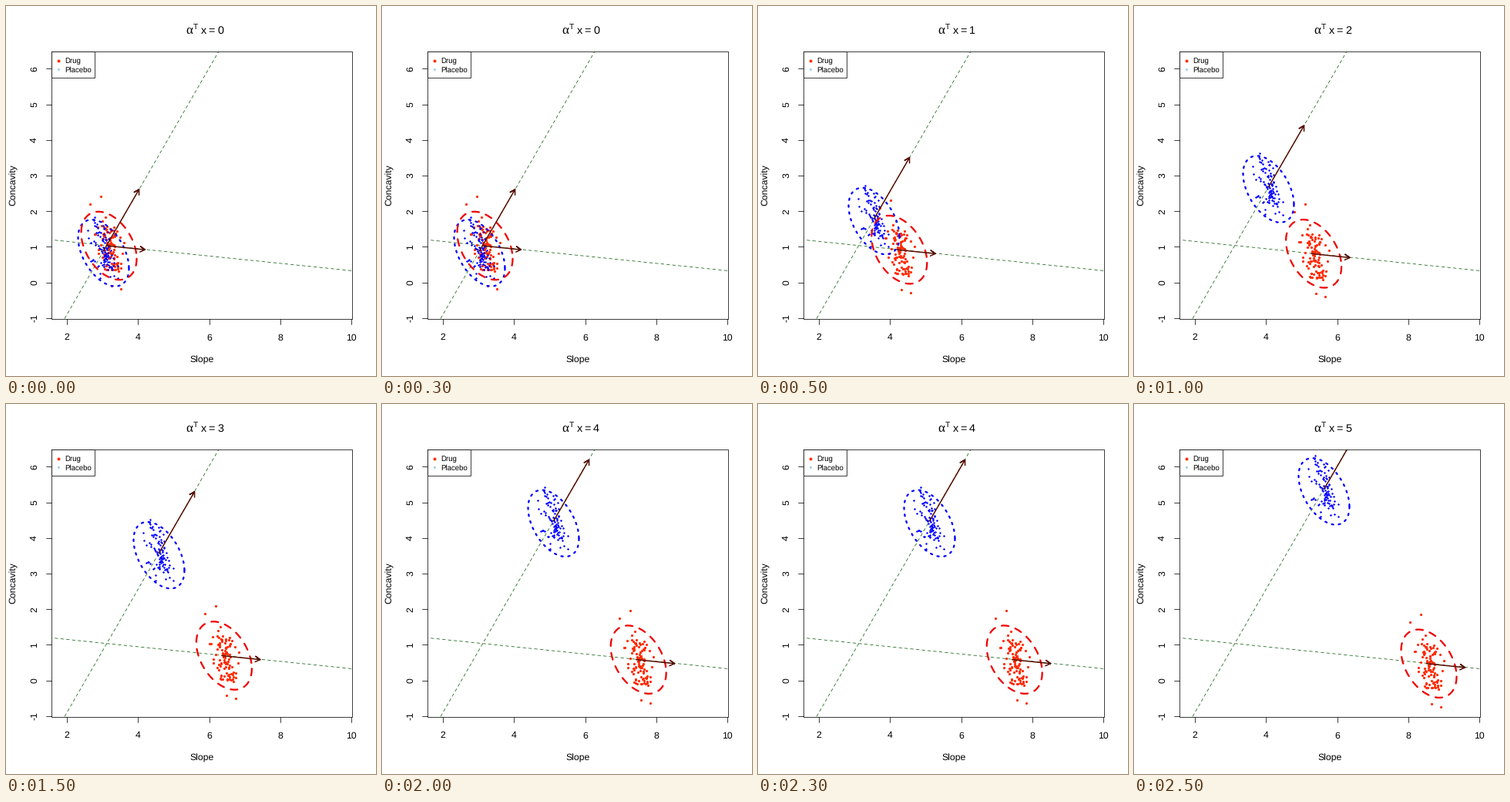
These frames come from a looping animation (480 by 480 pixels, 3000 ms). A matplotlib script:

```python
import numpy as np
import matplotlib.pyplot as plt
from matplotlib.animation import FuncAnimation

plt.rcParams.update({
    "font.family": "Liberation Sans",
    "text.hinting": "none",
    "lines.solid_capstyle": "round",
    "lines.dash_capstyle": "round",
})

STAGE, DPI = 480, 72
LEFT, RIGHT, TOP, BOTTOM = 59, 449.2, 59, 406.2
UNIT = 46.2
RED, BLUE, BROWN, GREEN = "#ff2a00", "#0000ff", "#560d00", "#0a5f0a"

rng = np.random.default_rng(12)


def px(x):
    return 78.7 + UNIT * (x - 2)


def py(y):
    return 358.5 - UNIT * y


def cloud(low, high, x0, lean, spread, count=98):
    """Random points scattered about a leaning axis."""
    y = rng.triangular(low, -3, high, count)
    x = x0 + lean * y + rng.normal(0, spread, count)
    return np.column_stack([x, y])


def ellipse(cx, cy, half_w, half_h, rho):
    t = np.linspace(0, 2 * np.pi, 200)
    x = cx + half_w * np.cos(t)
    y = cy + half_h * (rho * np.cos(t) + np.sqrt(1 - rho ** 2) * np.sin(t))
    return np.column_stack([x, y])


def arrow(vec, head=7.2):
    """Shaft and open head as one polyline starting at the origin."""
    tip = np.array(vec, float)
    back = np.arctan2(-tip[1], -tip[0])
    barbs = [tip + head * np.array([np.cos(back + a), np.sin(back + a)])
             for a in (np.pi / 6, -np.pi / 6)]
    return np.array([(0, 0), tip, barbs[0], tip, barbs[1]])


class Group:
    """A cloud with its ellipse and arrow, moved along one direction."""

    def __init__(self, start, step, parts):
        self.start, self.step = np.array(start), np.array(step)
        self.parts = [(shape, ax.plot([], [], **style)[0])
                      for shape, style in parts]

    def move(self, k):
        for shape, line in self.parts:
            line.set_data(*(shape + self.start + k * self.step).T)


fig = plt.figure(figsize=(STAGE / DPI, STAGE / DPI), dpi=DPI, facecolor="white")
ax = fig.add_axes([LEFT / STAGE, 1 - BOTTOM / STAGE,
                   (RIGHT - LEFT) / STAGE, (BOTTOM - TOP) / STAGE])
ax.set(xlim=(LEFT, RIGHT), ylim=(BOTTOM, TOP))
ax.axis("off")


def stroke(x, y, **kw):
    ax.plot(x, y, color="black", lw=0.75, clip_on=False, **kw)


def label(x, y, text, size=12.2, ha="center", **kw):
    return ax.text(x, y, text, size=size, ha=ha, va="baseline", **kw)


def side_label(x, y, text):
    ax.text(x, y, text, size=12.2, rotation=90, ha="right", va="center")


# Guide lines
for xs, ys in (((76.2, 276.5), (405.2, 58)), ((63.5, 449.5), (303.8, 343.5))):
    ax.plot(xs, ys, color=GREEN, lw=0.75, ls=(0, (5, 5)))

# Moving groups
red_step, blue_step = np.array([49.8, 5.15]), np.array([24, -41.4])
strays = [(-22, -54), (-8, -64), (6, 52), (18, 56)]
red_points = np.vstack([strays, cloud(-40, 46, 4, 0.15, 7.3)])
blue_points = cloud(-46, 40, 0, 0.22, 6.6)
shaft = dict(color=BROWN, lw=1.5, zorder=5, solid_joinstyle="round")

groups = [
    Group((130.5, 311), red_step, [
        (red_points, dict(ls="", marker="o", ms=3.2, mew=0, color=RED)),
        (ellipse(3, 0, 36, 44.2, 0.38),
         dict(color="#f00000", lw=2.25, ls=(0, (4, 4)), zorder=4)),
        (arrow(red_step), shaft),
    ]),
    Group((126.5, 317.5), blue_step, [
        (blue_points, dict(ls="", marker="D", ms=2.2, mew=0, color=BLUE)),
        (ellipse(0, 2.9, 33, 43.2, 0.46),
         dict(color=BLUE, lw=2.25, ls=(0, (1, 3)), zorder=3)),
        (arrow(1.92 * blue_step), shaft),
    ]),
]

# Frame and axes
stroke([LEFT, RIGHT, RIGHT, LEFT, LEFT], [TOP, TOP, BOTTOM, BOTTOM, TOP],
       zorder=6)
for v in range(2, 11, 2):
    stroke([px(v)] * 2, [BOTTOM, BOTTOM + 7.2])
    label(px(v), 433.4, str(v))
for v in range(-1, 7):
    stroke([LEFT - 7.2, LEFT], [py(v)] * 2)
    side_label(42.5, py(v), str(v))
label(254.2, 462.3, "Slope")
side_label(15.5, 232.4, "Concavity")

# Legend
ax.fill([LEFT, 115.2, 115.2, LEFT], [TOP, TOP, 93.2, 93.2], fc="white",
        ec="black", lw=0.75, clip_on=False, zorder=7)
for y, marker, size, color, text in ((70.5, "o", 3.9, RED, "Drug"),
                                     (82, "D", 2.8, "#a0d0ee", "Placebo")):
    ax.plot([67.5], [y], marker=marker, ms=size, mew=0, color=color, zorder=8)
    label(76, y + 3.5, text, 9.6, "left", zorder=8)

# Title
label(233.4, 36.3, "α", 17, "left", family="Liberation Serif")
label(243, 30, "T", 10.2, "left")
label(253, 36.3, "x", 14.4, "left")
label(262.2, 36.3, "=", 14.4, "left")
value = label(274, 36.3, "0", 14.4, "left")


def draw(k):
    value.set_text(str(k))
    for group in groups:
        group.move(k)
    return [value] + [line for g in groups for _, line in g.parts]


anim = FuncAnimation(fig, draw, frames=6, interval=500, repeat=True,
                     repeat_delay=0)
plt.show()
```
